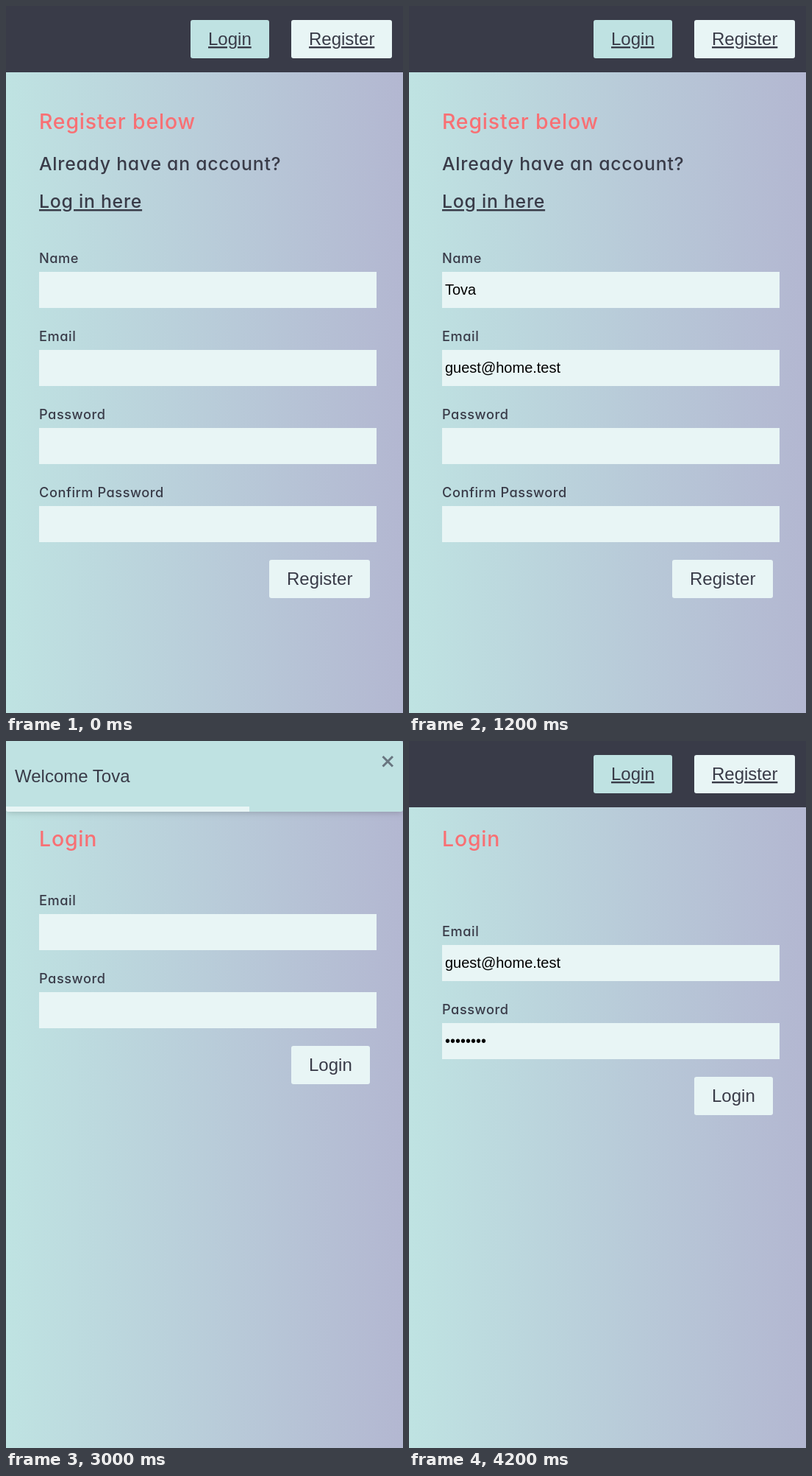
An HTML page with a canvas that plays this animation: 540x960 px, repeating every 4.8 s.

```html
<!DOCTYPE html>
<html lang="en">
<head>
<meta charset="utf-8">
<title>Register and log in</title>
<style>
  html, body { margin: 0; width: 100%; height: 100%; overflow: hidden; }
  canvas, svg { position: absolute; left: 0; top: 0; width: 540px; height: 960px; }
  text { font: 24px "Liberation Sans", Arial, sans-serif; fill: #393b48; white-space: pre; }
  .heading, .body, .label {
    font-family: Inter, sans-serif;
    font-weight: 500;
    font-feature-settings: "cv11";
    font-optical-sizing: none;
    letter-spacing: .03em;
  }
  .heading { font-size: 28.4px; fill: #f87074; }
  .body { font-size: 24.8px; }
  .label { font-size: 18.2px; }
  .value { font-size: 20px; fill: #000; }
  .link { text-decoration: underline; }
</style>
</head>
<body>
<canvas id="shapes" width="540" height="960"></canvas>
<svg id="words" viewBox="0 0 540 960"></svg>
<script>
const LOOP = 4800, STEP = 600;
const DARK = '#393b48', TEAL = '#bfe2e2', PALE = '#e8f5f5';
const NAME = 'Tova', EMAIL = 'guest@home.test', PASSWORD = '•'.repeat(8);

const ctx = document.getElementById('shapes').getContext('2d');
const words = document.getElementById('words');

function text(content, x, y, style = '') {
  const node = document.createElementNS('http://www.w3.org/2000/svg', 'text');
  node.setAttribute('x', x);
  node.setAttribute('y', y);
  node.setAttribute('class', style);
  node.textContent = content;
  words.append(node);
}

function box(x, y, w, h, color, radius = 0) {
  ctx.fillStyle = color;
  ctx.beginPath();
  ctx.roundRect(x, y, w, h, radius);
  ctx.fill();
}

function button(label, x, y, w, color = PALE, style = '') {
  box(x, y, w, 52, color, 3);
  text(label, x + 24, y + 34, style);
}

function field(label, y, value) {
  text(label, 45, y - 12, 'label');
  box(45, y, 459, 49, PALE);
  if (value) text(value, 49, y + 31, 'value');
}

function background() {
  const blend = ctx.createLinearGradient(0, 0, 540, 0);
  blend.addColorStop(0, '#bfe3e2');
  blend.addColorStop(1, '#b3b7d1');
  box(0, 0, 540, 960, blend);
}

function navigation() {
  box(0, 0, 540, 90, DARK);
  button('Login', 251, 19, 107, TEAL, 'link');
  button('Register', 388, 19, 137, PALE, 'link');
}

function toast() {
  ctx.save();
  ctx.shadowColor = 'rgba(0, 0, 0, .2)';
  ctx.shadowBlur = 10;
  ctx.shadowOffsetY = 1;
  box(0, 0, 540, 96, TEAL, 3);
  ctx.restore();
  box(0, 89, 331, 7, PALE, [0, 0, 0, 3]);
  text('Welcome ' + NAME, 12, 56);

  ctx.strokeStyle = '#697680';
  ctx.lineWidth = 3;
  ctx.beginPath();
  ctx.moveTo(512.5, 21);
  ctx.lineTo(526, 34.5);
  ctx.moveTo(526, 21);
  ctx.lineTo(512.5, 34.5);
  ctx.stroke();
}

function registerPage(filled) {
  text('Register below', 45, 167, 'heading');
  text('Already have an account?', 45, 223, 'body');
  text('Log in here', 45, 274, 'body link');
  const rows = [['Name', NAME], ['Email', EMAIL], ['Password', PASSWORD], ['Confirm Password', PASSWORD]];
  rows.forEach(([label, value], i) => field(label, 361 + 106 * i, i < filled && value));
  button('Register', 358, 752, 137);
}

function loginPage(filled) {
  const top = filled ? 277 : 235;
  text('Login', 45, 143, 'heading');
  field('Email', top, filled > 0 && EMAIL);
  field('Password', top + 106, filled > 1 && PASSWORD);
  button('Login', 388, top + 179, 107);
}

function draw(step) {
  words.replaceChildren();
  background();
  if (step === 5) toast();
  else navigation();
  if (step < 5) registerPage(step);
  else loginPage(step - 5);
}

let shown = -1;
const start = performance.now();

function tick() {
  const step = Math.floor((performance.now() - start) % LOOP / STEP);
  if (step !== shown) draw(shown = step);
  requestAnimationFrame(tick);
}
tick();
</script>
</body>
</html>
```
